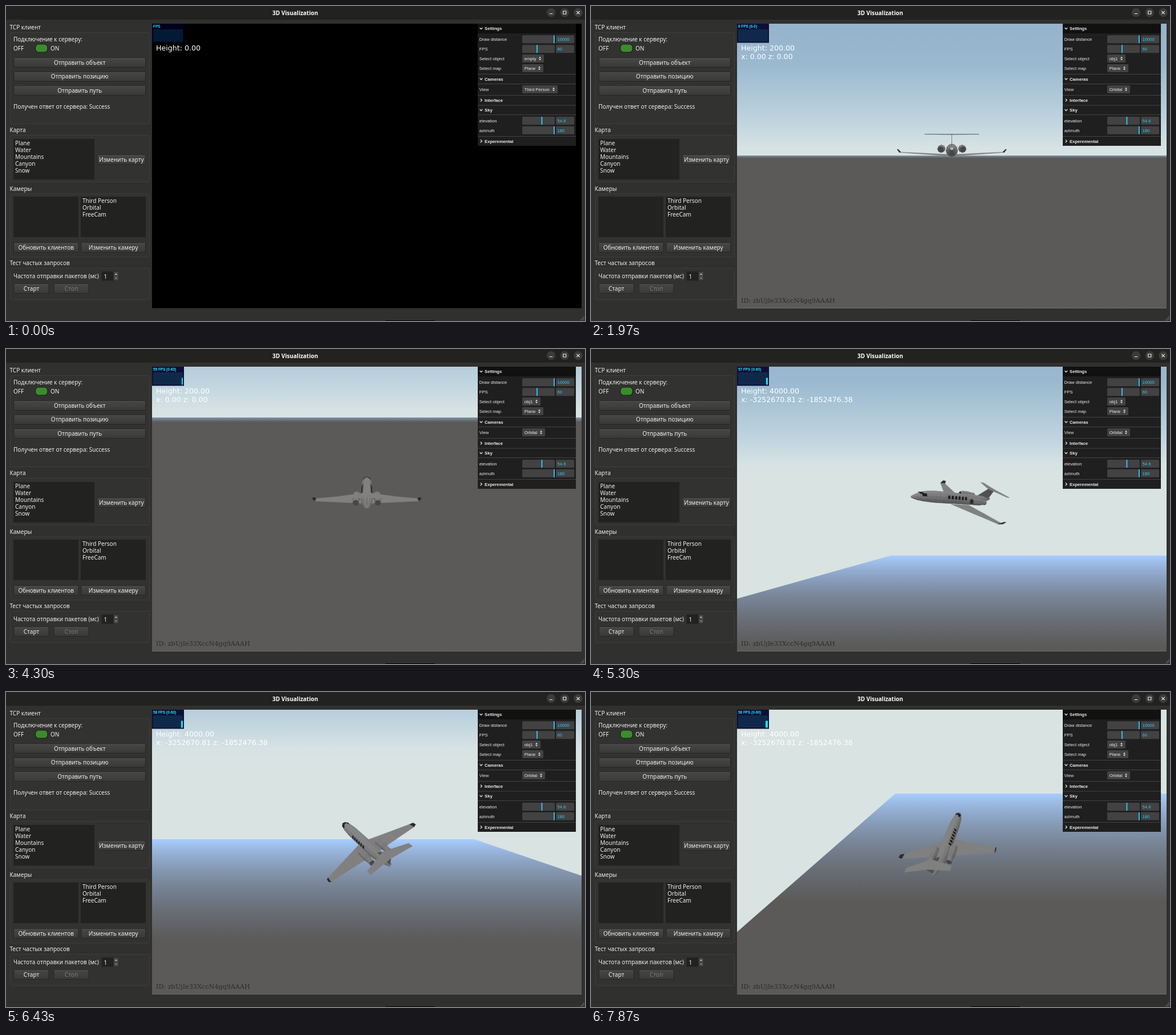
Animation, 1015 px wide and 552 px high, one loop 8 s. Source, as an HTML page:

```html
<!DOCTYPE html>
<html lang="ru">
<head>
<meta charset="utf-8">
<title>3D Visualization</title>
<style>
html, body { margin: 0; width: 100%; height: 100%; overflow: hidden; background: #30302f; }
svg { display: block; width: 1015px; height: 552px; }
text { white-space: pre; }
.ui { font-family: "Noto Sans", "Open Sans", sans-serif; }
.gui { font-family: "Liberation Sans", Arial, sans-serif; }
.hud { font-family: "DejaVu Sans", sans-serif; }
.id { font-family: "DejaVu Serif", serif; }
</style>
</head>
<body>
<svg id="stage" viewBox="0 0 1015 552" xmlns="http://www.w3.org/2000/svg"></svg>
<script>
const LOOP = 8000, MID = 632.5, FOCAL = 431, EYE = 400;
const LEFT = 256, RIGHT = 1009, TOP = 31, BOTTOM = 529.5;
const stage = document.getElementById('stage');

// ---------- markup helpers ----------
const rect = (x, y, w, h, fill, more = '') =>
  `<rect x="${x}" y="${y}" width="${w}" height="${h}" fill="${fill}" ${more}/>`;
const path = (d, stroke, w = 1, fill = 'none') =>
  `<path d="${d}" stroke="${stroke}" stroke-width="${w}" fill="${fill}"/>`;
const text = (x, cy, s, { cls = 'ui', size = 10, fill = '#f0f0ee', more = '' } = {}) =>
  `<text class="${cls}" x="${x}" y="${cy + size * 0.36}" font-size="${size}" fill="${fill}" ${more}>${s}</text>`;
const center = 'text-anchor="middle"';
const bold = 'font-weight="700"';
const gradient = (id, stops) =>
  `<linearGradient id="${id}" gradientUnits="userSpaceOnUse" x1="0" x2="0" y1="0" y2="1">` +
  stops.map(([o, c]) => `<stop offset="${o}" stop-color="${c}"/>`).join('') + '</linearGradient>';

// ---------- left side of the window ----------
function group(title, y, h) {
  return text(6.5, y - 8.3, title) +
    rect(7.5, y + 0.5, 244, h, '#323231', 'rx="2" stroke="#3d3d3b"');
}

function button(x, cy, w, label, id = '', off = false) {
  return rect(x + 0.5, cy - 8, w - 1, 16.4, 'url(#btn)', `rx="1.5" stroke="#262625" ${id && `id="${id}"`}`) +
    path(`M${x + 1.5} ${cy - 7}h${w - 3}`, '#52524f') +
    text(x + w / 2, cy, label, { fill: off ? '#7b7b79' : '#f0f0ee', more: center });
}

const list = (x, y, w, items) => rect(x, y, w, 71, '#222221') +
  items.map((s, i) => text(x + 3, y + 7.3 + i * 12, s)).join('');

function windowUi() {
  const dot = x => `<circle cx="${x}" cy="11.5" r="7.7" fill="#3b3b3a"/>`;
  return rect(0, 0, 1015, 552, '#30302f') + rect(0, 0, 1015, 24, '#222221') +
    text(507, 12, '3D Visualization', { fill: '#fff', more: center + ' ' + bold }) +
    dot(955.5) + dot(979.3) + dot(1003) +
    path('M952.8 13.5h5.4M976.8 9h5v5h-5zM1000.3 8.8l5.4 5.4m0-5.4l-5.4 5.4', '#f2f2f2', 1.1) +
    group('TCP клиент', 46, 160) +
    text(13, 58.3, 'Подключение к серверу:') +
    text(13, 74.5, 'OFF') + text(78, 74.5, 'ON') +
    rect(51.5, 67, 21.5, 14, '#3b8c2c', 'rx="5.5" stroke="#1b1b1a" stroke-width="1.2"') +
    button(13.5, 99, 231.5, 'Отправить объект', 'sendObj') +
    button(13.5, 123.5, 231.5, 'Отправить позицию', 'sendPos') +
    button(13.5, 148, 231.5, 'Отправить путь') +
    text(13, 176.2, 'Получен ответ от сервера: Success') +
    group('Карта', 226, 82) +
    list(13, 233, 142, ['Plane', 'Water', 'Mountains', 'Canyon', 'Snow']) +
    button(159.5, 269, 85.5, 'Изменить карту') +
    group('Камеры', 328.5, 111) +
    list(13, 334, 114, []) + list(131, 334, 114, ['Third Person', 'Orbital', 'FreeCam']) +
    button(13, 423, 114.5, 'Обновить клиентов') +
    button(131.5, 423, 113.5, 'Изменить камеру') +
    group('Тест частых запросов', 459, 55) +
    text(13, 473.5, 'Частота отправки пакетов (мс)') +
    rect(167.5, 465, 21, 16.5, '#222221') + text(171.5, 474, '1') +
    rect(188.5, 465.5, 9, 15.5, '#484846', 'stroke="#2a2a29"') +
    path('M191 471l2-2.4l2 2.4z', 'none', 0, '#d0d0d0') +
    path('M191 476l2 2.4l2-2.4z', 'none', 0, '#8c8c8a') +
    button(13.5, 495, 62, 'Старт') + button(83.5, 495, 62, 'Стоп', '', true) +
    path('M1007 551l7-7m-4 7l4-4', '#777775', 1) +
    rect(665, 551, 87, 1, '#000');
}

// ---------- settings panel ----------
const guiText = (x, cy, s, o = {}) => text(x, cy, s, { cls: 'gui', size: 7.7, fill: '#ebebeb', ...o });

function folder(cy, name, open) {
  const mark = open ? `M830.6 ${cy - 1.5}l2.3 2.6l2.3-2.6` : `M831.8 ${cy - 2.4}l2.5 2.4l-2.5 2.4`;
  return path(mark, '#ebebeb', 1.2) + guiText(839, cy, name, { more: bold });
}

const slider = (cy, name, knob, value) => guiText(829.7, cy, name) +
  rect(905, cy - 7, 57, 14, '#424242', 'rx="1.5"') + rect(knob - 1, cy - 7, 1.8, 14, '#2cc9ff') +
  rect(964, cy - 7, 32, 14, '#424242', 'rx="1.5"') + guiText(966.5, cy, value, { fill: '#2cc9ff' });

function select(cy, name, value, w) {
  const x = 905 + w - 7;
  return guiText(829.7, cy, name) + rect(905, cy - 7, w, 14, '#424242', 'rx="1.5"') +
    guiText(908.7, cy, value) +
    path(`M${x - 2} ${cy - 0.8}l2-2.5l2 2.5zM${x - 2} ${cy + 0.8}l2 2.5l2-2.5z`, 'none', 0, '#ebebeb');
}

function panel(object, objectW, view, viewW) {
  const rule = y => rect(827, y, 172, 1, '#434343');
  return rect(827, 31, 172, 214, '#1f1f1f') + rect(827, 31, 172, 17, '#111') +
    [119, 136, 156, 173.5, 190, 228].map(rule).join('') +
    folder(39.5, 'Settings', true) +
    slider(58.3, 'Draw distance', 961, '10000') + slider(75.2, 'FPS', 931, '60') +
    select(92, 'Select object', object, objectW) + select(109, 'Select map', 'Plane', 37) +
    folder(128, 'Cameras', true) + select(146, 'View', view, viewW) +
    folder(165, 'Interface', false) + folder(182.5, 'Sky', true) +
    slider(201, 'elevation', 939.5, '54.6') + slider(217.8, 'azimuth', 961, '180') +
    folder(236.8, 'Experemental', false);
}

// ---------- time helpers ----------
function sample(keys, t) {
  if (t <= keys[0][0]) return keys[0].slice(1);
  const i = keys.findIndex(k => k[0] > t);
  if (i < 0) return keys[keys.length - 1].slice(1);
  const a = keys[i - 1], b = keys[i], u = (t - a[0]) / (b[0] - a[0]);
  return a.slice(1).map((v, j) => v + (b[j + 1] - v) * u);
}
const latest = (steps, t) => steps.filter(s => s[0] <= t).pop();

// ---------- aircraft: x forward, y left, z up ----------
const hull = [[-80, 2, 5], [-56, 7, 2], [-34, 9.5, 0], [50, 9.5, 0], [70, 8, -0.5], [84, 4.8, -2], [92, 0.8, -3]];

function tube(faces, from, to, step, at, side, sides, grey) {
  const point = (x, a) => {
    const [r, z] = at(x);
    return [x, side + r * Math.cos(a), z + r * Math.sin(a)];
  };
  for (let x = from; x < to; x += step) {
    const x2 = Math.min(to, x + step);
    const nx = (at(x)[0] - at(x2)[0]) / (x2 - x);
    for (let i = 0; i < sides; i++) {
      const a = i / sides * 2 * Math.PI, b = (i + 1) / sides * 2 * Math.PI, m = (a + b) / 2;
      faces.push({
        pts: [point(x, a), point(x2, a), point(x2, b), point(x, b)],
        n: [nx, Math.cos(m), Math.sin(m)], grey, solid: true, bias: 0
      });
    }
  }
}

function patch(faces, x, w, a, b, s) {
  const [r, z] = sample(hull, x);
  const p = (px, ang) => [px, s * (r + 0.3) * Math.cos(ang), z + (r + 0.3) * Math.sin(ang)];
  faces.push({
    pts: [p(x - w, a), p(x + w, a), p(x + w, b), p(x - w, b)],
    n: [0.1, s * Math.cos((a + b) / 2), Math.sin((a + b) / 2)], grey: 28, dark: true, solid: true, bias: -7
  });
}

function buildPlane() {
  const faces = [];
  tube(faces, -80, 92, 8, x => sample(hull, x), 0, 12, 100);
  for (const s of [1, -1]) {
    tube(faces, -52, -18, 8.5, x => [x < -43 ? 4.5 : 6, 3], s * 17, 8, 96);
    const disc = x => Array.from({ length: 8 }, (_, i) => {
      const a = i * Math.PI / 4;
      return [x, s * 17 + 4.5 * Math.cos(a), 3 + 4.5 * Math.sin(a)];
    });
    faces.push({ pts: disc(-18), n: [1, 0, 0], grey: 45, dark: true, solid: true, bias: 0 });
    faces.push({ pts: disc(-52), n: [-1, 0, 0], grey: 70, dark: true, solid: true, bias: 0 });
    const sheet = (pts, grey = 96, dark = false) =>
      faces.push({ pts: pts.map(([x, y, z]) => [x, s * y, z]), n: [0, 0, 1], grey, dark, bias: 0 });
    for (let i = 0; i < 4; i++) {
      const at = (u, lead) => [lead ? 16 - 35 * u : -26 - 5 * u, 6 + 79 * u, -9 + 6 * u];
      const u = i / 4, v = u + 0.25;
      sheet([at(u, 1), at(v, 1), at(v, 0), at(u, 0)]);
    }
    sheet([[-19, 85, -3], [-26, 88, 2], [-33, 88, 2], [-31, 85, -3]], 42, true);
    sheet([[-66, 0, 25], [-81, 37, 25], [-90, 37, 25], [-86, 0, 25]]);
    for (let i = 0; i < 6; i++) patch(faces, 27 - i * 7.6, 2, 0.2, 0.75, s);
    patch(faces, 73, 4, 0.45, 1.0, s);
    patch(faces, 77, 3.5, 1.05, 1.5, s);
  }
  faces.push({ pts: [[-44, 0, 8], [-68, 0, 25], [-87, 0, 25], [-77, 0, 4]], n: [0, 1, 0], grey: 80, bias: 0 });
  return faces;
}
const planeFaces = buildPlane();

const dot = (a, b) => a[0] * b[0] + a[1] * b[1] + a[2] * b[2];
const cross = (a, b) => [a[1] * b[2] - a[2] * b[1], a[2] * b[0] - a[0] * b[2], a[0] * b[1] - a[1] * b[0]];
const unit = a => a.map(v => v / Math.hypot(...a));

// nose and left are directions on screen: right, down, away
function drawPlane([cx, cy, ...dirs]) {
  const nose = unit(dirs.slice(0, 3)), raw = dirs.slice(3), lean = dot(raw, nose);
  const left = unit(raw.map((v, i) => v - lean * nose[i]));
  const up = cross(nose, left);
  const turn = p => [0, 1, 2].map(i => p[0] * nose[i] + p[1] * left[i] + p[2] * up[i]);
  const shown = [];
  for (const f of planeFaces) {
    const pts = f.pts.map(turn);
    const mid = [0, 1, 2].map(i => pts.reduce((s, p) => s + p[i], 0) / pts.length);
    const away = dot(turn(f.n), [mid[0], mid[1], mid[2] + EYE]) > 0;
    if (away && f.solid) continue;
    const sign = away ? -1 : 1;
    const v = f.dark ? f.grey : Math.round(f.grey + sign * (f.n[2] * 32 + f.n[0] * 18));
    const d = pts.map(([x, y, z]) => {
      const k = EYE / (EYE + z);
      return (cx + x * k).toFixed(1) + ',' + (cy + y * k).toFixed(1);
    }).join(' ');
    shown.push([mid[2] + f.bias, `<polygon points="${d}" fill="rgb(${v},${v},${v})" stroke="rgb(${v},${v},${v})" stroke-width=".4"/>`]);
  }
  return shown.sort((a, b) => b[0] - a[0]).map(s => s[1]).join('');
}

// ---------- motion ----------
// time, horizon
const tilt = [[1670, 317], [2510, 163], [3110, 163], [3320, 120]];
// time, horizon, offset of the ground edge at the middle, its slope
const orbit = [
  [5870, 362, -30, -0.28], [6030, 339, -16.3, -0.142], [6230, 298, 8, 0.05], [6430, 258, -64, 0.34],
  [6600, 226, -160, 0], [6900, 190, -130, -0.7], [7170, 178, -86.5, -0.874]
];
// time, centre, nose, left
const attitude = [
  [5870, 643, 262, -0.75, -0.06, -0.66, 0.55, 0.42, -0.72],
  [6030, 643, 260, -0.86, -0.12, -0.5, 0.33, 0.48, -0.81],
  [6430, 629, 265, -0.5, -0.46, 0.73, -0.8, 0.51, -0.22],
  [7170, 626, 263, 0.25, -0.66, 0.69, -0.89, 0.08, 0.4]
];
// time, label, bar width, bar height
const meter = [
  [0, 'FPS', 0, 0], [1270, '0 FPS (0-0)', 0, 0], [2500, '34 FPS (0-34)', 1, 7], [3330, '60 FPS (0-60)', 1, 12],
  [4030, '59 FPS (0-60)', 2, 12], [5300, '57 FPS (0-60)', 3, 12], [6300, '58 FPS (0-60)', 3, 12], [7500, '58 FPS (0-60)', 4, 12]
];

// fog falls off with depth, which is the inverse of the distance below the horizon
const fogStops = Array.from({ length: 13 }, (_, i) => {
  const u = i / 12, f = (1 - u) / (1 + u);
  const mix = (a, b) => Math.round(a + (b - a) * f);
  return [u, `rgb(${mix(91, 168)},${mix(90, 205)},${mix(89, 255)})`];
});

stage.innerHTML = '<defs>' +
  '<linearGradient id="btn" x2="0" y2="1"><stop stop-color="#474745"/><stop offset="1" stop-color="#393937"/></linearGradient>' +
  gradient('sky', [[0, '#91afc7'], [0.45, '#9ab9cf'], [0.78, '#bed3de'], [0.95, '#d6e2e4'], [1, '#d8e3e2']]) +
  gradient('haze', [[0, '#8294a8'], [1, '#5b5a59']]) +
  gradient('fog', fogStops) +
  `<clipPath id="view">${rect(LEFT, TOP, RIGHT - LEFT, BOTTOM - TOP, '#000')}</clipPath></defs>` +
  windowUi() + rect(LEFT, TOP, RIGHT - LEFT, BOTTOM - TOP, '#000') +
  '<g id="scene" clip-path="url(#view)"></g><g id="hud"></g><g id="panel"></g>';
const $ = id => document.getElementById(id);

function setGradient(id, y1, y2) {
  $(id).setAttribute('y1', y1);
  $(id).setAttribute('y2', y2);
}

function ground(h, off, slope, fill) {
  const edge = x => Math.max(h, h + off + slope * (x - MID));
  const xs = [LEFT, RIGHT], corner = MID - off / slope;
  if (corner > LEFT && corner < RIGHT) xs.splice(1, 0, corner);
  return `<polygon points="${xs.map(x => x + ',' + edge(x)).join(' ')} ${RIGHT},530 ${LEFT},530" fill="url(#${fill})"/>`;
}

function drawScene(t) {
  if (t < 1270) return '';
  const far = t >= 5300;
  const [h, off, slope] = far ? sample(orbit, t) : [...sample(tilt, t), -999, 0];
  const skyEnd = far ? h - 145 : h;
  setGradient('sky', skyEnd - 290, skyEnd);
  if (far) setGradient('fog', h, h + 165 + (339 - h) * 0.16);
  else setGradient('haze', h, h + 3 + (317 - h) / 40);
  const out = rect(LEFT, TOP, 754, 499, 'url(#sky)') + ground(h, off, slope, far ? 'fog' : 'haze');
  if (t < 1670) return out + rect(632, TOP, 1, 118, '#f4f7f8');
  if (far) return out + drawPlane(sample(attitude, t));
  const e = Math.atan((280 - h) / FOCAL);
  return out + drawPlane([MID, 252, 0, -Math.sin(e), Math.cos(e), -1, 0, 0]);
}

function drawHud(t) {
  const on = t >= 1270, far = t >= 5300;
  const [, label, w, h] = latest(meter, t);
  const line = (cy, s) => text(263, cy, s, { cls: 'hud', size: 12.6, fill: '#fff' });
  let out = rect(256, 31, on ? 56 : 55, 33.5, on ? '#0d0f37' : '#00001e') +
    text(258, 35.2, label, { cls: 'gui', size: 6.4, fill: '#1ae8f2', more: bold }) +
    rect(258, 41, 52, 21.5, on ? '#10294a' : '#021a33') +
    rect(310 - w, 62.5 - h, w, h, '#1ae8f2') +
    line(73.5, 'Height: ' + (far ? '4000.00' : on ? '200.00' : '0.00'));
  if (on) {
    out += line(88.5, far ? 'x: -3252670.81 z: -1852476.38' : 'x: 0.00 z: 0.00') +
      text(263, 516, 'ID: zbUjIe33XccN4gq9AAAH', { cls: 'id', size: 11.2, fill: '#2c2c2c' });
  }
  return out;
}

let shownPanel = '';
function drawPanel(t) {
  const state = t < 1270 ? ['empty', 38, 'Third Person', 62]
    : t < 1670 ? ['obj2', 32, 'Third Person', 62] : ['obj1', 32, 'Orbital', 40];
  if (shownPanel === state.join()) return;
  shownPanel = state.join();
  $('panel').innerHTML = panel(...state);
}

const press = (id, down) => $(id).setAttribute('fill', down ? '#2b2b2a' : 'url(#btn)');

function draw(t) {
  $('scene').innerHTML = drawScene(t);
  $('hud').innerHTML = drawHud(t);
  drawPanel(t);
  press('sendObj', t >= 900 && t < 1030);
  press('sendPos', t >= 5030 && t < 5160);
}

let start;
function tick(now) {
  start ??= now;
  draw((now - start) % LOOP);
  requestAnimationFrame(tick);
}
draw(0);
requestAnimationFrame(tick);
</script>
</body>
</html>
```
